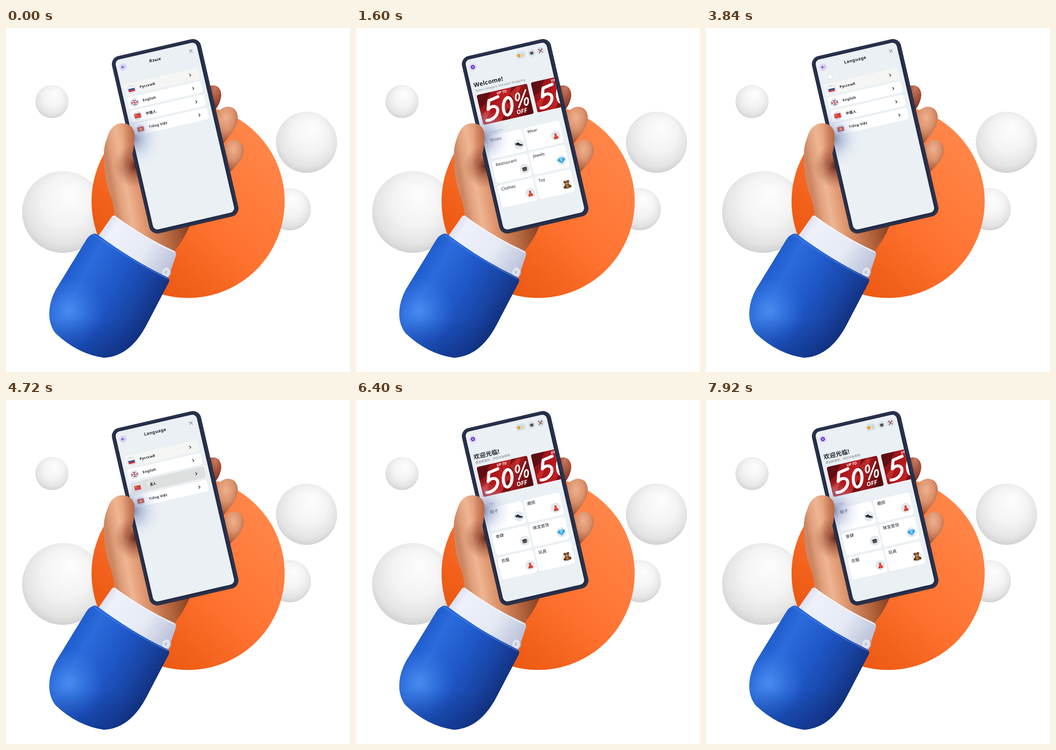
An HTML page that plays this animation: 748x748 px, repeating every 8 s.

```html
<!DOCTYPE html>
<html lang="en">
<head>
<meta charset="utf-8">
<title>Language switch</title>
<style>
html, body { margin: 0; width: 100%; height: 100%; overflow: hidden; background: #fff; }
svg { display: block; width: 100vw; height: 100vh; }
text { font-family: "Noto Sans", "Noto Sans CJK SC", "Noto Sans CJK", sans-serif; fill: #20222c; }
.brush { fill: none; stroke: #fff; stroke-linecap: round; stroke-linejoin: round; }
</style>
</head>
<body>
<svg viewBox="0 0 748 748" xmlns="http://www.w3.org/2000/svg">
<defs>
  <radialGradient id="ball" cx=".5" cy=".45" r=".58" fx=".6" fy=".26">
    <stop offset="0" stop-color="#fdfdfd"/><stop offset=".5" stop-color="#f4f4f4"/>
    <stop offset=".82" stop-color="#e4e4e4"/><stop offset="1" stop-color="#cdcdcd"/>
  </radialGradient>
  <linearGradient id="sun" x1=".8" y1=".08" x2=".12" y2=".8">
    <stop offset="0" stop-color="#ff8649"/><stop offset=".5" stop-color="#ff7331"/><stop offset="1" stop-color="#ea560e"/>
  </linearGradient>
  <linearGradient id="skin" gradientUnits="userSpaceOnUse" x1="213" y1="250" x2="360.6" y2="223.4">
    <stop offset="0" stop-color="#cd8662"/><stop offset=".08" stop-color="#e09f7c"/>
    <stop offset=".2" stop-color="#efb592"/><stop offset=".38" stop-color="#de956e"/>
    <stop offset=".55" stop-color="#c87a52"/><stop offset=".75" stop-color="#ae6039"/><stop offset="1" stop-color="#8a4021"/>
  </linearGradient>
  <linearGradient id="edge" gradientUnits="userSpaceOnUse" x1="254" y1="0" x2="281" y2="0">
    <stop offset="0" stop-color="#a9583c" stop-opacity="0"/><stop offset="1" stop-color="#a9583c" stop-opacity=".7"/>
  </linearGradient>
  <radialGradient id="crease" gradientUnits="userSpaceOnUse" cx="282" cy="300" r="48">
    <stop offset="0" stop-color="#571d18" stop-opacity=".95"/><stop offset=".4" stop-color="#8a3f29" stop-opacity=".6"/>
    <stop offset="1" stop-color="#a55a3a" stop-opacity="0"/>
  </radialGradient>
  <radialGradient id="tip" cx=".52" cy=".3" r=".8">
    <stop offset="0" stop-color="#efb08c"/><stop offset=".4" stop-color="#dc936e"/>
    <stop offset=".75" stop-color="#b4623f"/><stop offset="1" stop-color="#7a3324"/>
  </radialGradient>
  <radialGradient id="far" cx=".55" cy=".12" r=".9">
    <stop offset="0" stop-color="#c9795b"/><stop offset=".45" stop-color="#a5533d"/><stop offset="1" stop-color="#6e2a22"/>
  </radialGradient>
  <linearGradient id="cuff" gradientUnits="userSpaceOnUse" x1="210" y1="425" x2="360" y2="525">
    <stop offset="0" stop-color="#d5daeb"/><stop offset=".15" stop-color="#eef1fa"/>
    <stop offset=".6" stop-color="#e6eaf5"/><stop offset="1" stop-color="#b9c0d8"/>
  </linearGradient>
  <linearGradient id="sleeve" gradientUnits="userSpaceOnUse" x1="118" y1="540" x2="308" y2="650">
    <stop offset="0" stop-color="#1d5acb"/><stop offset=".2" stop-color="#2b6bdc"/>
    <stop offset=".5" stop-color="#1f58c8"/><stop offset=".78" stop-color="#1844a4"/><stop offset="1" stop-color="#12307c"/>
  </linearGradient>
  <radialGradient id="sheen" gradientUnits="userSpaceOnUse" cx="138" cy="615" r="75">
    <stop offset="0" stop-color="#4f95f5" stop-opacity=".8"/><stop offset="1" stop-color="#3a7ae6" stop-opacity="0"/>
  </radialGradient>
  <linearGradient id="hem" gradientUnits="userSpaceOnUse" x1="0" y1="630" x2="0" y2="718">
    <stop offset="0" stop-color="#0c2a78" stop-opacity="0"/><stop offset="1" stop-color="#0c2a78" stop-opacity=".45"/>
  </linearGradient>
  <radialGradient id="shade" gradientUnits="userSpaceOnUse" cx="275" cy="241" r="64">
    <stop offset="0" stop-color="#63709c" stop-opacity=".85"/><stop offset=".3" stop-color="#8a98c2" stop-opacity=".55"/>
    <stop offset=".65" stop-color="#bfcae6" stop-opacity=".3"/><stop offset="1" stop-color="#e3eaf7" stop-opacity="0"/>
  </radialGradient>
  <linearGradient id="sale" x1="0" y1="0" x2="1" y2=".3">
    <stop offset="0" stop-color="#7d1218"/><stop offset=".35" stop-color="#a8161b"/>
    <stop offset=".62" stop-color="#c92024"/><stop offset="1" stop-color="#6d1014"/>
  </linearGradient>
  <clipPath id="screen"><rect x="214.5" y="122" width="181" height="379" rx="10"/></clipPath>
  <clipPath id="card"><rect x="222.5" y="201.4" width="112.5" height="66.6" rx="4"/></clipPath>
  <g id="banner" clip-path="url(#card)">
    <path d="M222 201h114v68H222z" fill="url(#sale)"/>
    <path d="M222 201h32l-18 24-14 6zM300 201l-18 34 12-4 22-30zM262 268l20-24 8 5-8 19zM318 268l17-32v32z" fill="#4b0c10" opacity=".65"/>
    <path d="M292 215l20-13 8 4-18 24zM224 248l17-14 7 2-20 26z" fill="#e23a35" opacity=".6"/>
    <g class="brush">
      <path d="M267 215L246 219L240 237C252 229 264 235 259 247C254 257 243 262 232 260" stroke-width="6.5"/>
      <ellipse rx="9.5" ry="19" transform="translate(283 240) rotate(16)" stroke-width="6.5"/>
      <path d="M329 214L306 248" stroke-width="3.4"/>
      <ellipse rx="4" ry="8" transform="translate(308.5 225) rotate(18)" stroke-width="3.2"/>
      <ellipse rx="4" ry="8" transform="translate(325 239) rotate(18)" stroke-width="3.2"/>
    </g>
    <g font-weight="700" font-style="italic">
      <text x="266" y="210" font-size="8" style="fill:#fff">UP TO</text>
      <text x="299" y="262" font-size="13" style="fill:#fff">OFF</text>
    </g>
  </g>
</defs>

<g fill="url(#ball)">
  <circle cx="100" cy="160" r="36"/><circle cx="124" cy="400" r="89"/>
  <circle cx="653.5" cy="248.5" r="66.5"/><circle cx="617" cy="394" r="46"/>
</g>
<circle cx="396" cy="377" r="210" fill="url(#sun)"/>

<path d="M438 128Q452 121 462 129Q471 139 467 154Q463 170 452 181L440 176Z" fill="url(#far)"/>
<path d="M455 194Q462 174 482 171Q502 172 504 193Q504 212 492 227Q483 240 473 251L450 250Z" fill="url(#tip)"/>
<path d="M473 262Q481 243 498 242Q515 246 517 264Q517 280 505 294Q497 304 487 313L470 300Z" fill="url(#tip)"/>

<g id="hand"></g>

<g transform="rotate(-13)">
  <rect x="206.2" y="114.3" width="198.4" height="395.5" rx="18" fill="#1d2439"/>
  <rect x="207.4" y="115.5" width="196" height="393" rx="17" fill="#2b3552"/>
  <rect x="210" y="118" width="190.5" height="388" rx="14" fill="#242c46"/>
  <rect x="214.5" y="122" width="181" height="379" rx="10" fill="#eaf0f3"/>
  <g clip-path="url(#screen)">
    <path d="M377 136l7 7M384 136l-7 7M378 136l-1 2M384 138l-2-2" stroke="#85888f" fill="none"/>
    <g id="lang"></g>
    <g id="home"></g>
    <g transform="rotate(13)"><circle cx="275" cy="241" r="64" fill="url(#shade)"/></g>
  </g>
</g>
<circle id="dot" r="5" fill="#fff" fill-opacity=".78" stroke="#cfd3d8" stroke-width=".8"/>

<g id="thumb"></g>

<path d="M231 409Q235 406 240 411Q300 455 365 484Q372 488 369 496L352 546L300 540L198 456Z" fill="url(#cuff)"/>
<path d="M235 408Q300 456 368 488" fill="none" stroke="#fff" stroke-width="2" opacity=".8"/>
<g transform="translate(348 531) rotate(18)">
  <ellipse cx="1" rx="10" ry="12" fill="#b0b7ce"/><ellipse rx="8.5" ry="11" fill="#dfe3ef"/>
  <path d="M-3-3l5 6M2-3l-4 6" stroke="#a2a9c0" stroke-width="1.3"/>
</g>

<g id="arm"></g>
</svg>

<script>
const $ = id => document.getElementById(id);

// One outline painted with several fills
const layers = (d, ...fills) => fills.map(f => `<path d="${d}" fill="url(#${f})"/>`).join("");
const thumbTop = "M213 285Q211 260 220 238Q229 208 252 207Q277 208 279.5 232Q280 254 274 276Q269 288 267 300";
$("hand").innerHTML = layers("M213 285L280 240L418 360L399 431Q384 466 362 490L246 440L236 408Q235 383 224 357Q214 330 213 285Z", "skin", "crease");
$("thumb").innerHTML = layers(thumbTop + "Q262 316 250 322L217 322Q213 303 213 285Z", "skin", "crease") +
  layers(thumbTop + "L254 300L240 270Z", "edge");
$("arm").innerHTML = layers("M187 449Q192 445 199 449Q274 505 349 541Q357 545 354 553L306 645Q270 714 213 717Q156 709 108 664Q89 640 96 602Q101 578 116 556L173 463Q180 451 187 449Z", "sleeve", "sheen", "hem") +
  `<path d="M190 449Q274 508 352 545" fill="none" stroke="#4583e6" stroke-width="2.5" opacity=".6"/>`;

const text = (x, y, size, str, o = "") => `<text x="${x}" y="${y}" font-size="${size}" ${o}>${str}</text>`;
const at = (x, y, body) => `<g transform="translate(${x} ${y})">${body}</g>`;
const disc = (r, fill) => `<circle r="${r}" fill="${fill}"/>`;
const box = (x, y, w, h, r, fill, o = "") => `<rect x="${x}" y="${y}" width="${w}" height="${h}" rx="${r}" fill="${fill}" ${o}/>`;
const shape = (d, fill) => `<path d="${d}" fill="${fill}"/>`;

// Language list
const flags = [
  box(-7, -5, 14, 4, 1, "#fff") + box(-7, -1.6, 14, 3.4, 0, "#2b50a8") + box(-7, 1.7, 14, 3.6, 1, "#d12f2f"),
  box(-7, -5, 14, 10, 1, "#2c3f7d") +
    `<path d="M-7-5L7 5M7-5L-7 5M0-5V5M-7 0H7" stroke="#fff" stroke-width="2.4"/><path d="M0-5V5M-7 0H7" stroke="#cf3038" stroke-width="1.4"/>`,
  box(-7, -5, 14, 10, 1, "#d8281f") + at(-3.5, -2, disc(1.3, "#f4b52c")),
  box(-7, -5, 14, 10, 1, "#bf211c") + shape("M0-3.5L1-1H3.5L1.5 .5L2.3 3L0 1.5L-2.3 3L-1.5 .5L-3.5-1H-1Z", "#f6c62d")
];
const names = ["Русский", "English", "中国人", "Tiếng Việt"];
const rows = names.map((name, i) => {
  const y = 190 + 29.7 * i;
  return box(222, y - 12.5, 164, 25, 5, i ? "#fff" : "#f5f5f4") +
    box(222, y - 12.5, 164, 25, 5, "#dedfdf", `id="row${i}" opacity="0"`) +
    at(236, y + 1, disc(9.8, "#e0e5ec") + flags[i]) +
    text(254.3, y + 3, 7.5, name, 'font-weight="700" letter-spacing=".35"') +
    `<path d="M365.5 ${y - 3}l3 3l-3 3" fill="none" stroke="#20222c" stroke-width="1.3"/>`;
}).join("");
$("lang").innerHTML = at(229, 140, disc(8, "#dcd6f2") +
    `<path d="M3.5 0H-3.5M-.5-3L-3.5 0L-.5 3" fill="none" stroke="#6636c9" stroke-width="1.2"/>`) +
  text(300.5, 143.5, 9.3, "", 'id="title" text-anchor="middle" font-weight="700" letter-spacing=".4"') + rows;

// Shop
const cup = shape("M-6-1Q0 2 6-1L4 5H-4Z", "#4a4645") +
  `<ellipse cy="-1.5" rx="6.5" ry="2.5" fill="#a9a29c"/><ellipse cy="-1.5" rx="5" ry="1.6" fill="#302a28"/>` +
  shape("M-7 4Q0 8 7 4Q0 5-7 4Z", "#77726f");
const dress = shape("M-2.5-7L-1.5-5H1.5L2.5-7L2-1L6 6Q0 9-6 6L-2-1Z", "#d93327") +
  shape("M-1.5-1H1.5L1 6H-1Z", "#ef5a43");
const shoe = shape("M-8-4L-5-3L-2-5L3 0Q8 1 8 4H3L-8-1Z", "#24262d") + shape("M-8-1L3 4H8V5.5H2L-8 1Z", "#8b909c");
const gem = shape("M-5-6H5L9-1L0 8L-9-1Z", "#2f9ddf") + shape("M-5-6H5L3-1H-3ZM-3-1H3L0 8Z", "#74cdf5");
const pair = (x, y, body) => at(-x, y, body) + at(x, y, body);
const bear = pair(4, -7, disc(2.5, "#5d3618")) + at(0, 3, disc(6, "#75451e")) + pair(6, 5, disc(3, "#5d3618")) +
  at(0, -4, disc(5, "#8b5528")) + at(0, -2.5, disc(2.2, "#d6a66c")) + at(0, 4, disc(3, "#b47a40")) +
  pair(2, -5, disc(.7, "#20140c"));
const icons = [shoe, dress, cup, gem, dress, bear];

const words = {
  en: ["Welcome!", "Select Category and start shopping", "Categories", "Shoes", "Wear", "Restourant", "Jewels", "Clothes", "Toy"],
  zh: ["欢迎光临!", "请选择类别，然后开始购物", "类别:", "鞋子", "磨损", "食肆", "珠宝首饰", "衣服", "玩具"]
};
const labels = key => {
  const [hi, sub, cat, ...items] = words[key];
  return `<g id="${key}">` + text(221.5, 183.5, 13, hi, 'font-weight="700" letter-spacing=".3"') +
    text(222, 194, 6.3, sub, 'letter-spacing=".2" style="fill:#747b85"') +
    text(230, 288.5, 6, cat, 'letter-spacing=".2" style="fill:#97a2b2"') +
    items.map((w, i) => text(229 + i % 2 * 83, 307 + 54.5 * (i >> 1), 9, w, 'font-weight="500"')).join("") + "</g>";
};
const cards = icons.map((icon, i) => {
  const right = i % 2, y = 294.5 + 54.5 * (i >> 1);
  return box(right ? 305 : 222, y, right ? 80 : 79, 49.5, 5, "#fff") +
    at(right ? 370.5 : 288.5, y + 31.5, disc(10.8, "#e3e9ef") + `<g transform="scale(.95)">${icon}</g>`);
}).join("");
const teeth = [0, 45, 90, 135].map(a => box(-1.2, -4.8, 2.4, 9.6, .5, "#6931cf", `transform="rotate(${a})"`)).join("");
$("home").innerHTML =
  at(228.5, 140, disc(8, "#dedaf0") + teeth + disc(3.7, "#6931cf") + disc(1.5, "#e8e2f7")) +
  box(325, 130.5, 22, 15.5, 7.7, "#d8e1e8") + at(331.5, 138.3, disc(3.5, "#f59a16")) +
  text(337.5, 141, 7, "0", 'style="fill:#ee9a3c"') +
  at(360, 138.5, disc(8, "#d8e1e8") + `<g transform="scale(.68)">${cup}</g>`) +
  at(379.8, 138.5, disc(8, "#d9dfe4") +
    `<path d="M-4-4L4 4M4-4L-4 4" stroke="#8d3730" stroke-width="1.4"/><path d="M-4-4l2 .5M4-4l-.5 2" stroke="#332c30" stroke-width="1.3"/>`) +
  `<use href="#banner"/><use href="#banner" x="121"/>` +
  text(222.5, 288.5, 6, "6", 'style="fill:#97a2b2"') + cards + labels("en") + labels("zh");

// Tracks: [time, value, value, ...]
const tracks = {
  lang: [[0, 1], [1040, 1], [1160, 0], [3360, 0], [3480, 1], [5640, 1], [5760, 0]],
  home: [[0, 0], [1360, 0], [1480, 1], [3120, 1], [3240, 0], [6120, 0], [6240, 1]],
  row1: [[0, 0], [160, 0], [220, 1], [400, 1], [520, 0]],
  row2: [[0, 0], [4600, 0], [4680, 1], [4880, 1], [5000, 0]],
  dot: [[0, 309, 156, 0], [120, 309, 156, 0], [200, 309, 156, 1], [400, 309, 156, 1], [880, 255, 84, 1],
    [1240, 255, 84, 1], [1400, 255, 84, 0], [2720, 256, 79, 0], [2880, 256, 79, 1], [3520, 256, 79, 1],
    [4480, 309, 184, 1], [4960, 309, 184, 1], [5440, 255, 84, 1], [5840, 255, 84, .8], [6080, 255, 84, 0]]
};
const ease = p => p * p * (3 - 2 * p);
function sample(track, t) {
  const n = track.findIndex(k => k[0] > t);
  if (n < 0) return track[track.length - 1].slice(1);
  const a = track[n - 1], b = track[n], p = ease((t - a[0]) / (b[0] - a[0]));
  return a.slice(1).map((v, i) => v + (b[i + 1] - v) * p);
}

function draw(now) {
  const t = now % 8000, chinese = t >= 4960;
  for (const id of ["lang", "home", "row1", "row2"]) $(id).setAttribute("opacity", sample(tracks[id], t)[0]);
  $("title").textContent = t < 400 ? "Язык" : chinese ? "语言" : "Language";
  $("en").setAttribute("display", chinese ? "none" : "inline");
  $("zh").setAttribute("display", chinese ? "inline" : "none");
  const [x, y, alpha] = sample(tracks.dot, t);
  $("dot").setAttribute("transform", `translate(${x} ${y})`);
  $("dot").setAttribute("opacity", alpha);
}

let start;
function tick(now) {
  start ??= now;
  draw(now - start);
  requestAnimationFrame(tick);
}
draw(0);
requestAnimationFrame(tick);
</script>
</body>
</html>
```
